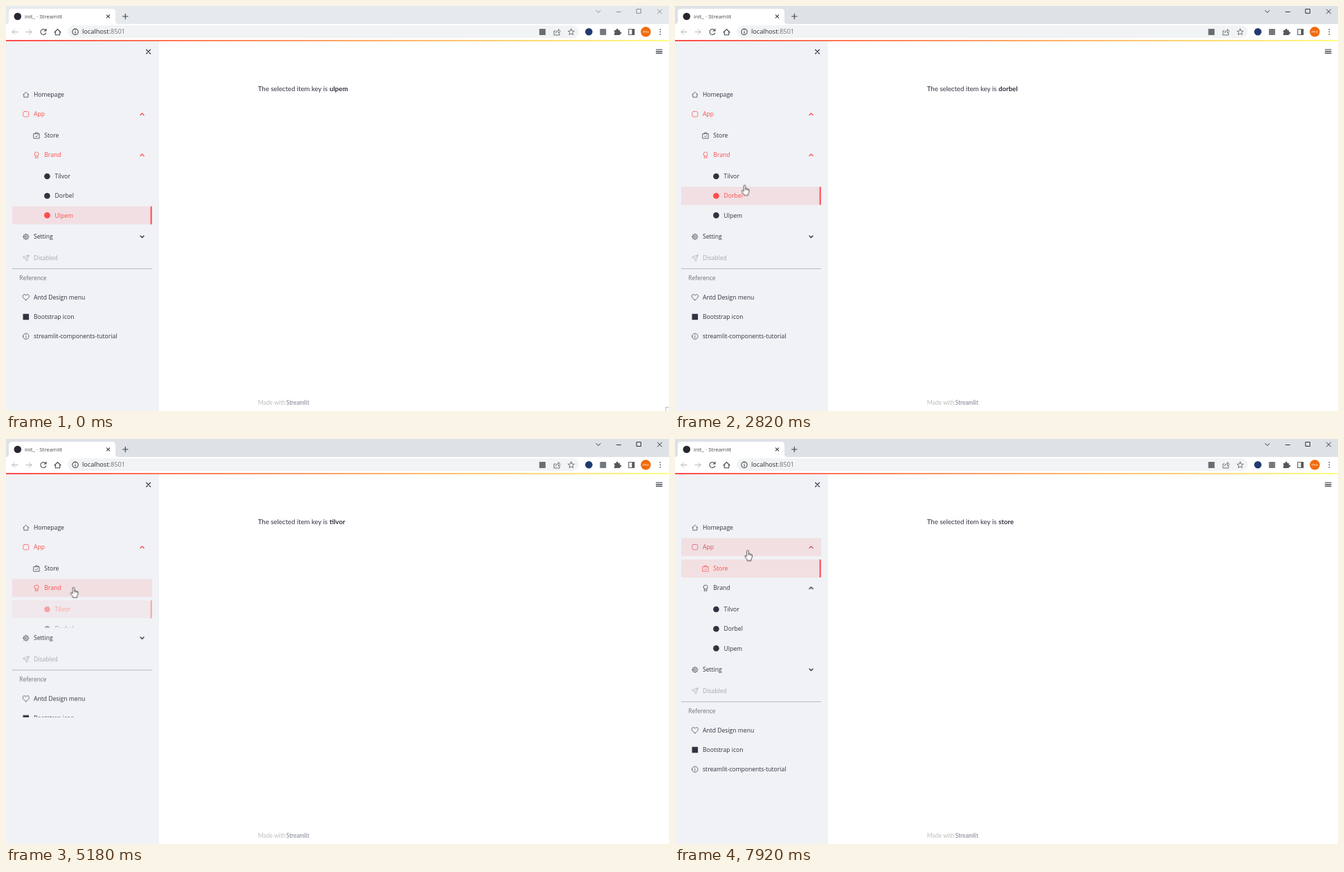
Animation of 957x585 px, one loop 7.99 s. Source, as an HTML page:

```html
<!DOCTYPE html>
<html lang="en">
<head>
<meta charset="utf-8">
<title>Sidebar menu</title>
<style>
  html, body { margin: 0; width: 100%; height: 100%; overflow: hidden; background: #fff; }
  svg { display: block; }
  text { font-family: "Open Sans", "Noto Sans", sans-serif; font-size: 8.6px; fill: currentColor; white-space: pre; }
  .page { font-family: Lato, sans-serif; font-size: 9.65px; color: #31333f; }
  .footer { font-family: Lato, sans-serif; font-size: 8.5px; }
  .line { fill: none; stroke: currentColor; stroke-linecap: round; stroke-linejoin: round; }
  .row { color: #31333f; }
  .hot { color: #ff4b4b; }
  .off { color: #a6a8b0; }
  .bg { fill: #ff4b4b; opacity: 0; }
  .bar { fill: #ff4b4b; transform: scaleY(0); }
  .bar, .caret { transform-box: fill-box; transform-origin: center; }
  .key { font-weight: 700; }
  #status, #frameEnd, #hand { opacity: 0; }
</style>
</head>
<body>
<svg id="stage" width="957" height="585" viewBox="0 0 957 585">
  <defs>
    <linearGradient id="ribbon">
      <stop offset="0" stop-color="#ff4b4b"/><stop offset="1" stop-color="#fffd80"/>
    </linearGradient>
  </defs>

  <!-- browser window -->
  <rect id="strip" width="957" height="27" fill="#e7eaed"/>
  <path d="M0 26Q4 26 4 22V9Q4 4 9 4H153Q158 4 158 9V22Q158 26 162 26V27H0Z" fill="#fff"/>
  <circle cx="16.800" cy="15" r="5.300" fill="#262730"/>
  <text x="27" y="18" style="font-size:7.85px" color="#45494d">init_ · Streamlit</text>
  <g class="line" color="#3c4043" stroke-width="1.100">
    <path d="M145.300 12.800l4.400 4.400m0-4.400l-4.400 4.400M168.500 15h7.500m-3.750-3.750v7.500"/>
  </g>
  <g id="controls" class="line" color="#8b8e92" stroke-width="1">
    <path d="M852 6.500l3 3l3-3M881.500 8.500h6M910.500 4.500h6v6h-6ZM940.500 5l6 6m0-6l-6 6"/>
  </g>
  <rect y="26" width="957" height="23.500" fill="#fff"/>
  <rect x="89" y="28" width="738" height="18" rx="9" fill="#f1f3f4"/>
  <g class="line" color="#b4b6b9" stroke-width="1">
    <path d="M17 37.500h-8m3.700-3.700l-3.700 3.700l3.700 3.700M29 37.500h8m-3.700-3.700l3.700 3.700l-3.700 3.700"/>
  </g>
  <g class="line" color="#45494d" stroke-width="1.100">
    <path d="M57.300 35.300a4 4 0 1 0 .4 3.700M58 33v3h-3M70 38l4.500-4.500l4.500 4.500M71.300 37v4.700h6.400V37"/>
    <circle cx="100" cy="37.300" r="4.200"/>
    <path d="M100 37v2.400M100 35v.1"/>
  </g>
  <text x="110" y="40.400" style="font-size:9.2px" color="#292c30">localhost<tspan fill="#70757a">:8501</tspan></text>
  <rect x="769.800" y="33" width="9" height="9" fill="#6a6e73"/>
  <g class="line" color="#5f6368" stroke-width=".9">
    <path d="M793 36h-2v6h8v-3M793.500 39q.5-3.500 4-3.500v-2l2.500 3l-2.500 2.500v-1.800"/>
    <path d="M815.800 33l1.300 3l3.200.300l-2.400 2.100l.7 3.200l-2.800-1.700l-2.800 1.700l.7-3.200l-2.400-2.100l3.200-.300Z"/>
    <path d="M898.800 33.500h8v8h-8Z" stroke-width="1.200"/>
  </g>
  <circle cx="841.300" cy="37.300" r="5.300" fill="#223a70"/>
  <rect x="857.300" y="33" width="9" height="9" rx="1" fill="#75797d"/>
  <path d="M878 35h2.600a1.700 1.700 0 1 1 3.200 0h2.400v2.500a1.600 1.600 0 1 1 0 3v1.500h-8.200v-2.500a1.500 1.500 0 0 0 0-2.600Z" fill="#55595d"/>
  <rect x="903.500" y="33.500" width="3.500" height="8" fill="#55595d"/>
  <circle cx="923.500" cy="37.300" r="7.200" fill="#f16a0b"/>
  <text x="923.500" y="39.300" text-anchor="middle" style="font-size:6px" color="#fff">mo</text>
  <path d="M944.300 33.800v.01M944.300 37.300v.01M944.300 40.800v.01" class="line" color="#45494d" stroke-width="1.700"/>

  <!-- page -->
  <rect y="51" width="221" height="534" fill="#f0f2f6"/>
  <rect y="49" width="957" height="2" fill="url(#ribbon)"/>
  <path d="M202.500 63l6 6m0-6l-6 6" class="line" color="#31333f" stroke-width="1.100"/>
  <path d="M938.500 63h8.500m-8.500 2.600h8.500m-8.500 2.600h8.500" class="line" color="#31333f" stroke-width="1.200"/>
  <g id="status" color="#808495">
    <circle cx="833" cy="60.300" r="1.500" fill="currentColor"/>
    <path d="M828.500 63.500h9M833 63.500v4M833 67l-2 5M833 67l2 5" class="line" stroke-width="1.800"/>
    <text x="846" y="68.500" class="footer" style="font-size:7.5px">RUNNING...</text>
    <text x="902.500" y="68.500" class="footer">Stop</text>
  </g>
  <text x="363.700" y="122.600" class="page">The selected item key is</text>
  <g id="keys"></g>
  <text x="363.700" y="576" class="footer" color="#bcbcb8">Made with</text>
  <text x="404.500" y="576" class="footer" color="#7d8190">Streamlit</text>

  <!-- menu -->
  <g id="upper"></g>
  <g id="brandList"></g>
  <g id="lower">
    <rect y="318.300" width="221" height="360" fill="#f0f2f6"/>
    <path d="M9 379.500H211" stroke="#b9bbc3"/>
    <text x="19.300" y="396.300" style="font-size:8.4px" color="#6d6f79">Reference</text>
  </g>
  <rect id="frameEnd" y="402" width="221" height="183" fill="#f0f2f6"/>

  <rect id="grip" x="952.500" y="579.500" width="6" height="7" fill="#fff" stroke="#b9b9b9"/>
  <g id="cursor" fill="#fff" stroke="#2b2b2b" stroke-width=".8" stroke-linejoin="round">
    <path id="arrow" d="M0 0V10.500L2.500 8.300L4.200 12L5.800 11.300L4.200 7.700H7.500Z"/>
    <path id="hand" d="M-1.300 1Q0-1 1.300 1V5.200Q2.500 4.500 3.200 5.600Q4.500 5 5 6.300Q6.600 6 6.500 8Q6.600 11 5 12.800V15H-1V13.300Q-2.800 11.500-4.200 9.300Q-4.200 7.500-2.600 8L-1.300 9.300ZM1.300 5.200V7.500M3.200 5.600V7.700M5 6.300V8"/>
  </g>
</svg>

<script>
const LOOP = 7990;
const DARK = '#31333f', RED = '#ff4b4b', PINK = 0.11;
const EASE = 'cubic-bezier(.645,.045,.355,1)';
const $ = id => document.getElementById(id);

// Looping track through [ms, value] points, held before the first and after the last.
function track(el, prop, points, easing = 'linear') {
  const all = [[0, points[0][1]], ...points, [LOOP, points.at(-1)[1]]];
  el.animate(all.map(([t, v]) => ({ offset: t / LOOP, [prop]: v, easing })),
    { duration: LOOP, iterations: Infinity });
}
// Hard switches: [ms, value] holds until the next point.
function cuts(el, prop, points) {
  const steps = points.flatMap(([t, v], i) => i ? [[t, points[i - 1][1]], [t, v]] : [[t, v]]);
  track(el, prop, steps);
}
const fade = (t, from, to, length = 300) => [[t, from], [Math.min(t + length, LOOP), to]];

function add(parent, tag, attrs, text = '') {
  const el = document.createElementNS('http://www.w3.org/2000/svg', tag);
  for (const name in attrs) el.setAttribute(name, attrs[name]);
  el.textContent = text;
  return parent.appendChild(el);
}

const ring = r => `M${-r} 0a${r} ${r} 0 1 0 ${2 * r} 0a${r} ${r} 0 1 0 ${-2 * r} 0Z`;
const teeth = Array.from({ length: 8 }, (_, i) => {
  const a = i * Math.PI / 4, c = Math.cos(a), s = Math.sin(a);
  return `M${3.6 * c} ${3.6 * s}L${4.2 * c} ${4.2 * s}`;
}).join('');
const ICONS = {
  home: 'M-4 .2L0-3.800L4 .2M-3-.8V3.800H3V-.8',
  app: 'M-2-3.800H2Q4-3.800 4-1.800V1.800Q4 3.800 2 3.800H-2Q-4 3.800-4 1.800V-1.800Q-4-3.800-2-3.800Z',
  bag: 'M-4-2.500H4V4.200H-4ZM-2-2.500V-3.500Q0-5.500 2-3.500V-2.500M-1.600 1L-.4 2.200L1.900-.2',
  award: 'M-3-1.300a3 3 0 1 0 6 0a3 3 0 1 0-6 0M-1.800 1.500V4.500L0 3.600L1.800 4.500V1.500',
  gear: ring(3.5) + ring(1.5) + teeth,
  send: 'M4.300-4.300L1.300 4.200L-.6.6L-4.200-1.300ZM4.300-4.300L-.6.6',
  heart: 'M0 4C-9-1-3-6.500 0-2.700C3-6.500 9-1 0 4Z',
  info: ring(4.2) + 'M0-.4V2.200M0-2.200V-2',
  dot: ring(4.3),
  square: 'M-4.300-4.300H4.300V4.300H-4.300Z'
};

function row(parent, label, y, level, icon, { kind = '', caret = 0 } = {}) {
  const g = add(parent, 'g', { class: 'row ' + kind });
  const x = 40 + 15.3 * level;
  const solid = icon === 'dot' || icon === 'square';
  const bg = add(g, 'rect', { class: 'bg', x: 9, y: y - 13, width: 202, height: 26 });
  const bar = add(g, 'rect', { class: 'bar', x: 208.6, y: y - 13, width: 2, height: 26 });
  add(g, 'path', {
    class: solid ? '' : 'line', d: ICONS[icon], 'stroke-width': 0.7,
    fill: solid ? 'currentColor' : 'none', transform: `translate(${x - 11.2} ${y})`
  });
  add(g, 'text', { x, y: y + 3.1 }, label);
  const holder = add(g, 'g', { transform: `translate(196.5 ${y})` });
  const arrow = caret && add(holder, 'path', {
    class: 'line caret', 'stroke-width': 1.4, d: `M-2.500 ${1.2 * caret}L0 ${-1.2 * caret}L2.500 ${1.2 * caret}`
  });
  return { g, bg, bar, arrow };
}

const upper = $('upper'), list = $('brandList'), lower = $('lower');
row(upper, 'Homepage', 128, 0, 'home');
const app = row(upper, 'App', 156.2, 0, 'app', { kind: 'hot', caret: 1 });
const store = row(upper, 'Store', 187, 1, 'bag');
const brand = row(upper, 'Brand', 215.2, 1, 'award', { kind: 'hot', caret: 1 });
const first = row(list, 'Tilvor', 246, 2, 'dot');
const second = row(list, 'Dorbel', 274.2, 2, 'dot');
const third = row(list, 'Ulpem', 302.4, 2, 'dot');
row(lower, 'Setting', 333.3, 0, 'gear', { caret: -1 });
row(lower, 'Disabled', 364.2, 0, 'send', { kind: 'off' });
row(lower, 'Antd Design menu', 420.7, 0, 'heart');
row(lower, 'Bootstrap icon', 449, 0, 'square');
row(lower, 'streamlit-components-tutorial', 477.2, 0, 'info');

// Hover and selection tint, then the selection bar.
const tint = (item, on, off) => {
  const points = (a, b) => [...(on ? fade(on, a, b) : []), ...(off ? fade(off, b, a) : [])];
  track(item.bg, 'opacity', points(0, PINK));
  track(item.g, 'color', points(DARK, RED));
};
const mark = (item, on, off) => track(item.bar, 'transform', [
  ...(on ? fade(on, 'scaleY(0)', 'scaleY(1)', 140) : []),
  ...(off ? fade(off, 'scaleY(1)', 'scaleY(0)', 140) : [])
]);
tint(third, 0, 1960);
mark(third, 0, 1960);
tint(second, 1350, 3740);
mark(second, 1980, 3750);
tint(first, 2900, 7320);
mark(first, 3850, 7330);
tint(store, 6370, 0);
mark(store, 7400, 0);
track(brand.bg, 'opacity', [...fade(4620, 0, PINK), ...fade(6400, PINK, 0)]);
track(brand.g, 'color', fade(7400, RED, DARK));
track(app.bg, 'opacity', fade(7690, 0, PINK, 230));
track(app.g, 'color', fade(7720, RED, '#cc5a5f', 200));

// Submenu folds away and back.
const fold = (el, prop, open, shut) =>
  track(el, prop, [...fade(5030, open, shut), ...fade(5940, shut, open)], EASE);
fold(lower, 'transform', 'translateY(0px)', 'translateY(-87px)');
fold(list, 'opacity', 1, 0);
fold(brand.arrow, 'transform', 'scaleY(1)', 'scaleY(-1)');
cuts($('frameEnd'), 'opacity', [[0, 0], [5040, 1], [5940, 0]]);

// Page text and run status.
[['ulpem', 0, 2300], ['dorbel', 2300, 4040], ['tilvor', 4040, 7830], ['store', 7830, LOOP]]
  .forEach(([name, from, to]) => {
    const key = add($('keys'), 'text', { x: 467, y: 122.6, class: 'page key' }, name);
    cuts(key, 'opacity', [[0, from ? 0 : 1], [from, 1], [to, to < LOOP ? 0 : 1]]);
  });
track($('status'), 'opacity', [
  [1960, 0], [2080, .1], [2270, .45], [2400, 0],
  [3700, 0], [3820, .1], [3980, .45], [4100, 0],
  [7330, 0], [7460, .15], [7700, .5], [7900, 0]
]);

// The window gains focus with the first click.
cuts($('strip'), 'fill', [[0, '#e7eaed'], [1940, '#dee1e6']]);
cuts($('controls'), 'color', [[0, '#8b8e92'], [1940, '#303236']]);

// Pointer.
track($('cursor'), 'transform', [
  [20, 951, 579], [830, 318, 332], [1110, 206, 311], [1390, 106, 285], [1670, 104, 280],
  [2680, 104, 280], [2820, 100.5, 258.5], [3150, 98.5, 250], [4450, 98.5, 250],
  [4850, 97.5, 214], [6250, 97.5, 214], [6670, 103.5, 170], [6900, 104, 181],
  [7570, 104, 181], [7800, 105, 160.5]
].map(([t, x, y]) => [t, `translate(${x}px, ${y}px)`]));
cuts($('grip'), 'opacity', [[0, 1], [70, 0]]);
cuts($('hand'), 'opacity', [[0, 0], [1110, 1], [6600, 0], [6760, 1]]);
cuts($('arrow'), 'opacity', [[0, 0], [70, 1], [1110, 0], [6600, 1], [6760, 0]]);
</script>
</body>
</html>
```
